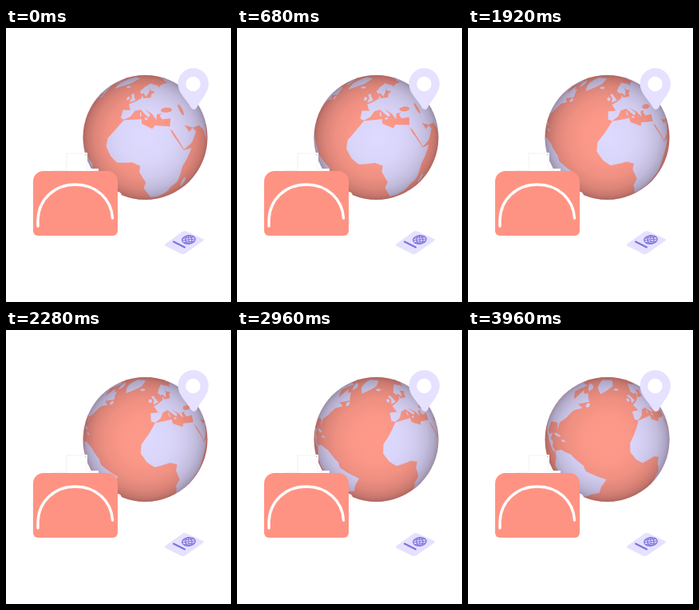
An HTML page with a canvas for the animation above (4 s loop, 282 by 343 pixels).

```html
<!DOCTYPE html>
<html lang="en">
<head>
<meta charset="utf-8">
<title>Travel globe</title>
<style>
  html, body { margin: 0; width: 100%; height: 100%; overflow: hidden; background: #fff; }
  canvas { display: block; }
</style>
</head>
<body>
<canvas id="stage" width="282" height="343"></canvas>
<script>
const ctx = document.getElementById('stage').getContext('2d');
const LOOP = 4000, STEP = 40;
const CX = 174.5, CY = 137, R = 78;
const RAD = Math.PI / 180;
const TILT = 24.5 * RAD;      // latitude facing the viewer
const DISTANCE = 3.5;         // camera distance in globe radii
const START_LON = 13.2, SPEED = 12;   // degrees, degrees per second
const CORAL = '#ff9383', OCEAN = '#ff9a8a', LAND = '#dedaff', PALE = '#e5e1ff', VIOLET = '#7d72dc';

// Simplified coastlines: longitude, latitude pairs
const africa = [-5.6,35.8, 10,37.3, 10.3,34, 19,30.3, 21,32.6, 32.3,31.2, 35.5,24, 43.2,12, 51.2,11.9,
  42,-1, 40,-15, 35,-20, 32.6,-27, 26,-34, 19,-34.5, 12,-17.5, 13.7,-11, 9,-1, 9.7,4, 4,6.4, -7.6,4.4,
  -13,8.5, -17.4,14.7, -17,21, -10,30];
const europe = [-5.6,36, 0,39, 3.2,43.2, 9,44.4, 16,38.5, 18,40.4, 12.8,45, 19.5,41, 22.8,36.5, 24,40.6,
  29,41, 60,41, 60,69, 44,67, 37,64.5, 40,67, 25.5,71, 12,66, 5,61, 8,58, 11,59, 14,55.6, 18.7,60,
  23,65.8, 21.3,62, 28,60, 22,58, 20,54.5, 11,54, 9,57, 8.5,54, 1.6,50.8, -4.7,48.4, -1.5,43.4,
  -9,43.2, -9,37];
const asia = [26.5,39.5, 28,36.7, 36,36.5, 34,31.2, 32,30.5, 34.3,28, 35.3,28, 39,21, 43.4,12.7, 52,15.6,
  59.8,22.5, 56.3,26, 51.5,24, 48,29.8, 57,26, 66.5,25.3, 72.7,20, 77.5,8, 81,16, 91,22, 104,10,
  121,30, 140,50, 160,70, 104,77.5, 73,71.5, 72,68.5, 56,68.5, 56,45, 29,41.2];
const northAmerica = [-78,8, -83.5,11, -83.5,15, -88,16, -87,21.4, -91.5,18.5, -97,20, -97,28, -84,30,
  -80.5,25, -81.3,31, -75.7,35.3, -70,43, -61,46, -69,48.5, -56,52, -64.5,60, -69.5,58.5, -77,62.4,
  -79,52, -94,59, -83,69, -120,70, -160,70, -160,58, -124,45, -118,34, -105,20, -94,16, -83,8];
const southAmerica = [-78.5,9, -72,12, -62,10.7, -51.5,4.3, -50,0, -35,-6, -39,-14, -41,-22, -48.5,-26,
  -58,-36, -68,-53, -74,-50, -70.4,-18.5, -81,-5, -78,3];
const greenland = [-44,60, -22,70, -12,81, -60,82, -54,68];
const baffin = [-65,62, -88,73, -68,70, -62,66];
const britain = [-5,50, 1.5,52, -3,58.6, -6,57, -3.5,54];

// An oval outline around a place, for small islands and inland seas
const oval = (lon, lat, width, height) => Array.from({ length: 8 }, (_, i) => [
  lon + width * Math.cos(i * Math.PI / 4), lat + height * Math.sin(i * Math.PI / 4)
]).flat();
const iceland = oval(-18.5, 65, 4.5, 1.5);
const ireland = oval(-8, 53.3, 2, 1.8);
const newfoundland = oval(-56, 48.8, 2.5, 2);
const cuba = oval(-79.5, 21.5, 4.8, 1);
const hispaniola = oval(-71, 19, 2.4, .8);
const madagascar = oval(47, -19, 2, 6);
const sicily = oval(14, 37.5, 1.5, .7);
const sardinia = oval(9, 40.7, .6, 2);

const lands = [africa, europe, asia, northAmerica, southAmerica, greenland, baffin, britain,
  iceland, ireland, newfoundland, cuba, hispaniola, madagascar, sicily, sardinia];
const seas = [oval(34.5, 43.2, 6.3, 2), oval(51, 41.5, 2.2, 4.8)];

const disc = (x, y, r, fill) => {
  ctx.beginPath();
  ctx.arc(x, y, r, 0, 7);
  ctx.fillStyle = fill;
  ctx.fill();
};
const fillPath = (d, color) => { ctx.fillStyle = color; ctx.fill(new Path2D(d)); };
const strokePath = (d, color, width) => {
  ctx.strokeStyle = color;
  ctx.lineWidth = width;
  ctx.stroke(new Path2D(d));
};

function project(lon, lat, centerLon) {
  const a = (lon - centerLon) * RAD, b = lat * RAD;
  const x = Math.cos(b) * Math.sin(a);
  const y = Math.sin(b) * Math.cos(TILT) - Math.cos(b) * Math.sin(TILT) * Math.cos(a);
  const z = Math.sin(b) * Math.sin(TILT) + Math.cos(b) * Math.cos(TILT) * Math.cos(a);
  // Points past the horizon go outside the clipped disc
  const scale = z > 1 / DISTANCE
    ? R * Math.sqrt(DISTANCE ** 2 - 1) / (DISTANCE - z)
    : R * 1.25 / Math.hypot(x, y);
  return [CX + x * scale, CY - y * scale];
}

function fillRegion(points, centerLon, color) {
  ctx.beginPath();
  for (let i = 0; i < points.length; i += 2) {
    const j = (i + 2) % points.length;
    const dLon = points[j] - points[i], dLat = points[j + 1] - points[i + 1];
    const parts = Math.ceil(Math.hypot(dLon, dLat) / 4);
    for (let k = 0; k < parts; k++) {
      const f = k / parts;
      ctx.lineTo(...project(points[i] + dLon * f, points[i + 1] + dLat * f, centerLon));
    }
  }
  ctx.fillStyle = color;
  ctx.fill();
}

const shade = ctx.createRadialGradient(CX, CY, 0, CX, CY, R);
[[0, 0], [.4, .025], [.65, .08], [.82, .16], [.93, .26], [1, .38]]
  .forEach(([at, alpha]) => shade.addColorStop(at, `rgba(40,20,30,${alpha})`));

function drawGlobe(seconds) {
  const centerLon = START_LON - SPEED * seconds;
  ctx.save();
  ctx.beginPath();
  ctx.arc(CX, CY, R, 0, 7);
  ctx.clip();
  disc(CX, CY, R + 1, OCEAN);
  lands.forEach(p => fillRegion(p, centerLon, LAND));
  seas.forEach(p => fillRegion(p, centerLon, OCEAN));
  disc(CX, CY, R + 1, shade);
  ctx.restore();
}

function drawSuitcase() {
  fillPath('M60 176H116V181H60ZM132 205H141Q145 206 145 211V260H132Z', '#fff');
  strokePath('M76 179V157H101V177H115M60 178H76', '#f9f8f8', 2);
  ctx.beginPath();
  ctx.roundRect(34, 179, 106, 81, [13, 13, 6, 6]);
  ctx.fillStyle = CORAL;
  ctx.fill();
  strokePath('M40 248V240C41 214 61 196 87 196C113 196 132 214 133.5 238', '#fff', 3.4);
}

function drawPin() {
  fillPath('M215.5 69.5a19.2 19.2 0 0 1 38.4 0C254 82 243 90 239 100Q235.5 104 232 100C227 90 215.5 82 215.5 69.5Z', PALE);
  disc(234.5, 70, 9.2, '#fff');
}

function drawPassport() {
  fillPath('M200 270L221 255Q223 253.5 226 254.5L247 264Q249 265 247 266.5L225 282Q222 284 219 282.5L200 273Q198 271.5 200 270Z', PALE);
  strokePath('M210 267.5L224 274.5', VIOLET, 2);
  ctx.save();
  ctx.translate(229, 265);
  ctx.rotate(-.12);
  ctx.strokeStyle = VIOLET;
  ctx.lineWidth = 1.2;
  for (const width of [8.3, 4]) {
    ctx.beginPath();
    ctx.ellipse(0, 0, width, 5.2, 0, 0, 7);
    ctx.stroke();
  }
  strokePath('M-8 0H8M0 -5V5M-7 -2.6H7M-7 2.6H7', VIOLET, 1);
  ctx.restore();
}

function frame() {
  const time = performance.now() % LOOP;
  ctx.fillStyle = '#fff';
  ctx.fillRect(0, 0, 282, 343);
  ctx.lineCap = 'round';
  drawGlobe(Math.floor(time / STEP) * STEP / 1000);
  drawSuitcase();
  drawPin();
  drawPassport();
  requestAnimationFrame(frame);
}
frame();
</script>
</body>
</html>
```
